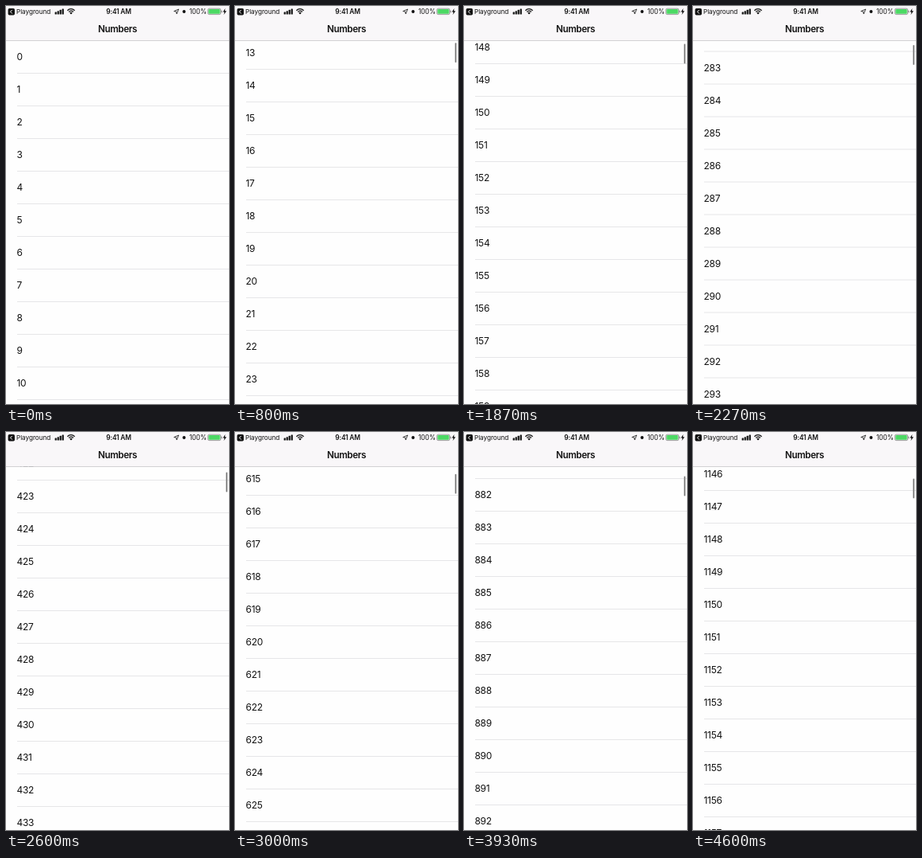
These frames come from a looping animation (281x500 px, 4.67 s). An HTML page with a canvas:

```html
<!DOCTYPE html>
<html lang="en">
<head>
<meta charset="utf-8">
<title>Numbers</title>
<style>
html, body { margin: 0; width: 100%; height: 100%; overflow: hidden; background: #fff; }
canvas { display: block; width: 281px; height: 500px; }
</style>
</head>
<body>
<canvas id="stage"></canvas>
<script>
const W = 281, H = 500, LOOP = 4670, STEP = 1000 / 15;
const ROW = 41, BAR = 43.5;
const canvas = document.getElementById('stage');
const ctx = canvas.getContext('2d');
const dpr = window.devicePixelRatio || 1;
canvas.width = Math.round(W * dpr);
canvas.height = Math.round(H * dpr);

// Scroll offset in pixels at given video ticks
const knots = [[6, 0], [21, 2574], [28, 6080], [39, 17326], [45, 25220], [59, 36147], [69, 46997]];
const rates = knots.slice(1).map((p, i) => (p[1] - knots[i][1]) / (p[0] - knots[i][0]));
const slopes = knots.map((p, i) => {
  if (i === 0) return 0;
  if (i === rates.length) return rates[i - 1];
  const a = rates[i - 1], b = rates[i];
  return 2 * a * b / (a + b);
});

function scrollAt(tick) {
  if (tick <= knots[0][0]) return 0;
  let i = 0;
  while (i < knots.length - 2 && tick > knots[i + 1][0]) i++;
  const [t0, y0] = knots[i], [t1, y1] = knots[i + 1];
  const d = t1 - t0, u = (tick - t0) / d, v = 1 - u;
  return y0 * (1 + 2 * u) * v * v + d * slopes[i] * u * v * v +
    y1 * u * u * (3 - 2 * u) - d * slopes[i + 1] * u * u * v;
}

function text(str, x, y, size, weight, spacing, align = 'left') {
  ctx.font = `${weight} ${size}px Inter, sans-serif`;
  ctx.letterSpacing = spacing + 'px';
  ctx.textAlign = align;
  ctx.fillText(str, x, y);
}

function box(x, y, w, h, r) {
  ctx.beginPath();
  ctx.roundRect(x, y, w, h, r);
}

function path(points, close) {
  ctx.beginPath();
  points.forEach(([x, y]) => ctx.lineTo(x, y));
  if (close) ctx.closePath();
}

function drawRows(offset) {
  const first = Math.max(0, Math.floor(offset / ROW) - 1);
  for (let n = first; n < first + 15; n++) {
    const y = 64 + n * ROW - offset;
    ctx.fillStyle = '#e6e6e8';
    ctx.fillRect(14, y + 20, W - 14, 1);
    ctx.fillStyle = '#111';
    text(String(n), 13.5, y + 4.4, 12, 400, -0.3);
  }
}

function drawThumb(offset) {
  ctx.fillStyle = '#929292';
  box(277, 46 + offset * 0.000264, 2.2, 25, 1.1);
  ctx.fill();
}

function drawWifi() {
  ctx.lineWidth = 1.3;
  for (const r of [3.9, 6.3]) {
    ctx.beginPath();
    ctx.arc(82, 10, r, -Math.PI * 0.76, -Math.PI * 0.24);
    ctx.stroke();
  }
  ctx.beginPath();
  ctx.moveTo(82, 10.4);
  ctx.arc(82, 10.4, 2.6, -Math.PI * 0.76, -Math.PI * 0.24);
  ctx.fill();
}

function drawBattery() {
  ctx.lineWidth = 0.7;
  ctx.strokeStyle = '#777';
  box(254.4, 3.2, 16.2, 7.4, 1.7);
  ctx.stroke();
  ctx.fillStyle = '#4cd964';
  box(255.3, 4.1, 14.4, 5.6, 0.8);
  ctx.fill();
  ctx.fillStyle = '#777';
  box(271.3, 5.6, 1, 2.6, 0.5);
  ctx.fill();
}

function drawHeader() {
  ctx.fillStyle = '#f9f7f9';
  ctx.fillRect(0, 0, W, BAR);
  ctx.fillStyle = '#c9c8cb';
  ctx.fillRect(0, 43, W, 0.8);

  ctx.fillStyle = ctx.strokeStyle = '#111';
  box(2.6, 3, 8.4, 8.4, 1.7);
  ctx.fill();
  ctx.strokeStyle = '#fff';
  ctx.lineWidth = 1;
  path([[7.8, 4.9], [5.5, 7.2], [7.8, 9.5]]);
  ctx.stroke();

  ctx.strokeStyle = '#111';
  text('Playground', 13, 10.1, 8.2, 400, -0.05);
  for (let i = 0; i < 4; i++) {
    const h = 2.8 + i * 1.4;
    box(61.6 + i * 3, 10.4 - h, 2.2, h, 0.5);
    ctx.fill();
  }
  drawWifi();
  text('9:41 AM', 142, 10.1, 8.4, 600, -0.2, 'center');

  ctx.lineWidth = 0.8;
  path([[217.6, 4], [215.1, 10], [214.6, 7], [211.7, 6.6]], true);
  ctx.stroke();
  ctx.beginPath();
  ctx.arc(224.4, 7, 2, 0, Math.PI * 2);
  ctx.fill();
  text('100%', 231, 10.1, 8.3, 400, -0.05);
  path([[276.4, 3], [273.3, 7.5], [275.3, 7.5], [274.5, 11], [277.9, 6.2], [275.8, 6.2]], true);
  ctx.fill();
  text('Numbers', 140.5, 33.2, 11.7, 600, -0.4, 'center');
  drawBattery();
}

function draw(ms) {
  const tick = Math.min(69, Math.floor((ms % LOOP + 5) / STEP));
  const offset = scrollAt(tick);
  ctx.setTransform(dpr, 0, 0, dpr, 0, 0);
  ctx.fillStyle = '#fefefe';
  ctx.fillRect(0, 0, W, H);
  drawRows(offset);
  if (offset > 0) drawThumb(offset);
  drawHeader();
}

const start = performance.now();
function loop() {
  draw(performance.now() - start);
  requestAnimationFrame(loop);
}
loop();
</script>
</body>
</html>
```
